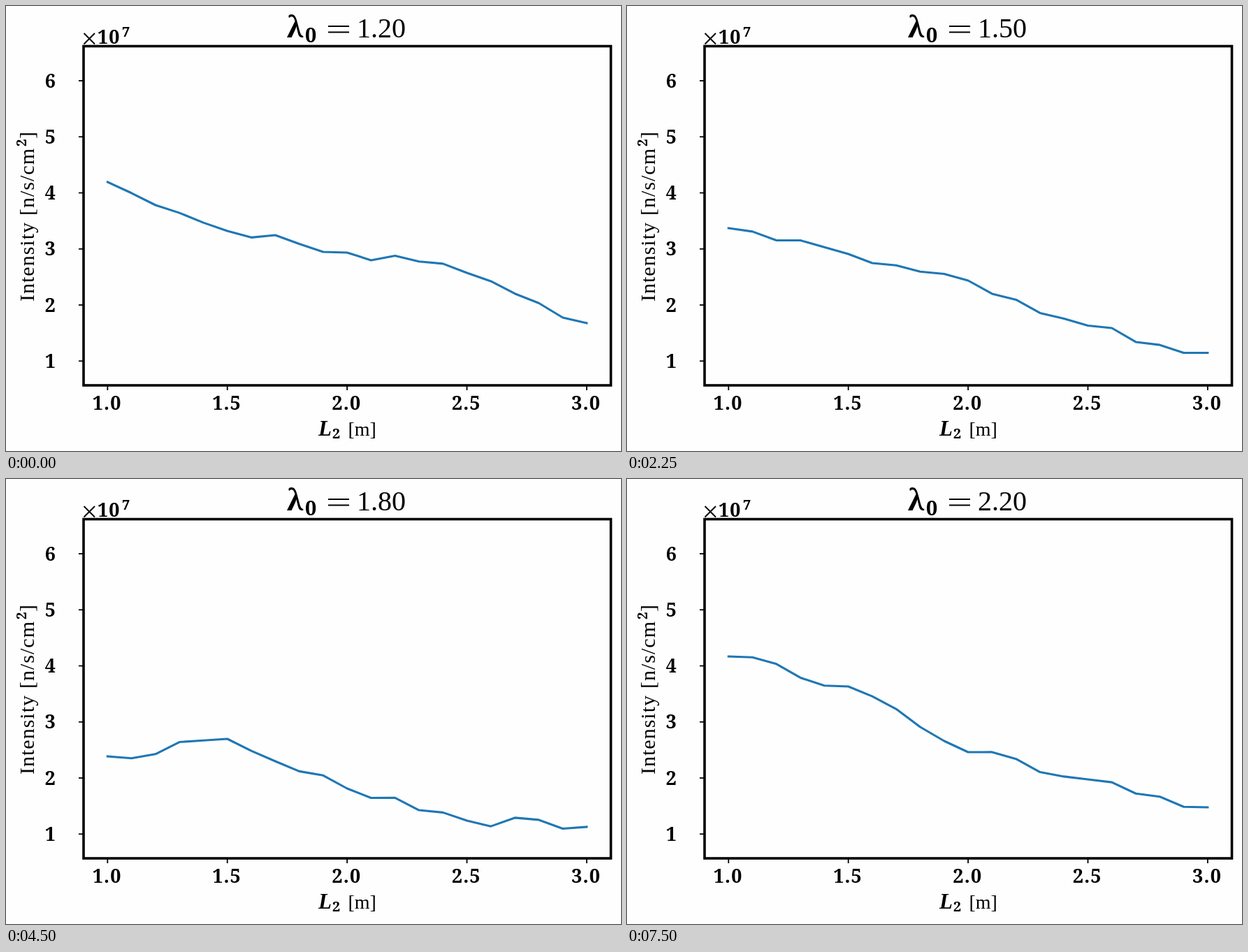
An HTML page that plays this animation: 880x637 px, repeating every 8 s.

```html
<!DOCTYPE html>
<html lang="en">
<head>
<meta charset="utf-8">
<title>Intensity against length</title>
<style>
  html, body { margin: 0; width: 100%; height: 100%; overflow: hidden; background: #fefefe; }
  svg { display: block; width: 880px; height: 637px; }
  text { font-family: "Liberation Serif", serif; fill: #000; }
  .bold { font-family: "Noto Serif", serif; font-weight: 700; font-size: 27px; letter-spacing: 1.2px; }
  .symbol { font-weight: 700; font-style: italic; }
  .label { font-size: 30px; letter-spacing: 1px; }
  path, rect, polyline { fill: none; stroke: #000; }
</style>
</head>
<body>
<svg viewBox="0 0 880 637">
  <g id="ticks"></g>
  <polyline id="curve" stroke-width="3.1" stroke-linejoin="round" stroke-linecap="square" style="stroke:#1f77b4"/>
  <rect x="111" y="57.5" width="754.5" height="485.5" stroke-width="3.6"/>

  <text class="bold" x="402" y="45" style="font-size:41px">λ</text>
  <text class="bold" x="428" y="51.5" style="font-size:29px">0</text>
  <path d="M461 29H491M461 37.5H491" stroke-width="1.8"/>
  <text id="value" x="572" y="45" font-size="40" text-anchor="end"></text>

  <path d="M111.5 39L127 54.5M127 39L111.5 54.5" stroke-width="1.9"/>
  <text class="bold" x="131" y="54">10</text>
  <text class="bold" x="166" y="44" style="font-size:20px">7</text>

  <text class="symbol" x="447" y="615" font-size="31">L</text>
  <text class="bold" x="467" y="619" style="font-size:20px">2</text>
  <text x="489.5" y="615" font-size="28">[m]</text>

  <g transform="translate(39.5 423) rotate(-90)">
    <text class="label">Intensity</text>
    <text class="label" x="123">[n/s/cm</text>
    <text class="bold" x="222" y="-11" style="font-size:19px">2</text>
    <text class="label" x="233">]</text>
  </g>
</svg>
<script>
const STEP = 750, LOOP = 8000, FIRST = 12;
const LEFT = 145.3, SPACING = 34.28, POINTS = 21, SPAN = 5, JITTER = 8;
const byId = id => document.getElementById(id);

// Curve heights at the five x ticks, keyed by ten times the wavelength.
const anchors = {
  12: [252, 322, 353, 382, 454],
  14: [276, 336, 362, 442, 481],
  16: [360, 374, 424, 473, 512],
  17: [301, 352, 408, 448, 476],
  18: [397, 372, 443, 489, 498],
  20: [368, 395, 458, 493, 516],
  22: [254, 297, 391, 430, 470]
};

// Wavelengths without anchors lie midway between their neighbours.
function anchorsFor(key) {
  return anchors[key] ||
    anchors[key - 1].map((y, i) => (y + anchors[key + 1][i]) / 2);
}

// Repeatable noise in -1..1.
function noise(key, i) {
  const s = Math.sin(key * 12.9898 + i * 78.233) * 43758.5453;
  return 2 * (s - Math.floor(s)) - 1;
}

function curvePoints(key) {
  const ys = anchorsFor(key);
  return Array.from({ length: POINTS }, (_, i) => {
    const k = Math.floor(i / SPAN), part = i % SPAN / SPAN;
    const y = part ? ys[k] + (ys[k + 1] - ys[k]) * part + JITTER * noise(key, i) : ys[k];
    return `${LEFT + SPACING * i},${y}`;
  }).join(" ");
}

function tick(path, label, x, y, anchor) {
  return `<path d="${path}" stroke-width="1.8"/>` +
    `<text class="bold" x="${x}" y="${y}" text-anchor="${anchor}">${label}</text>`;
}

let ticks = "";
for (let i = 0; i < 5; i++) {
  const x = LEFT + SPACING * SPAN * i;
  ticks += tick(`M${x} 543v7`, (1 + i / 2).toFixed(1), x - 0.7, 578, "middle");
}
for (let n = 1; n <= 6; n++) {
  const y = 588.5 - 80.25 * n;
  ticks += tick(`M111 ${y}h-7`, n, 72, y + 9.5, "end");
}
byId("ticks").innerHTML = ticks;

let shown;
function draw() {
  const key = FIRST + Math.floor(performance.now() % LOOP / STEP);
  if (key !== shown) {
    shown = key;
    byId("value").textContent = (key / 10).toFixed(2);
    byId("curve").setAttribute("points", curvePoints(key));
  }
  requestAnimationFrame(draw);
}
draw();
</script>
</body>
</html>
```
